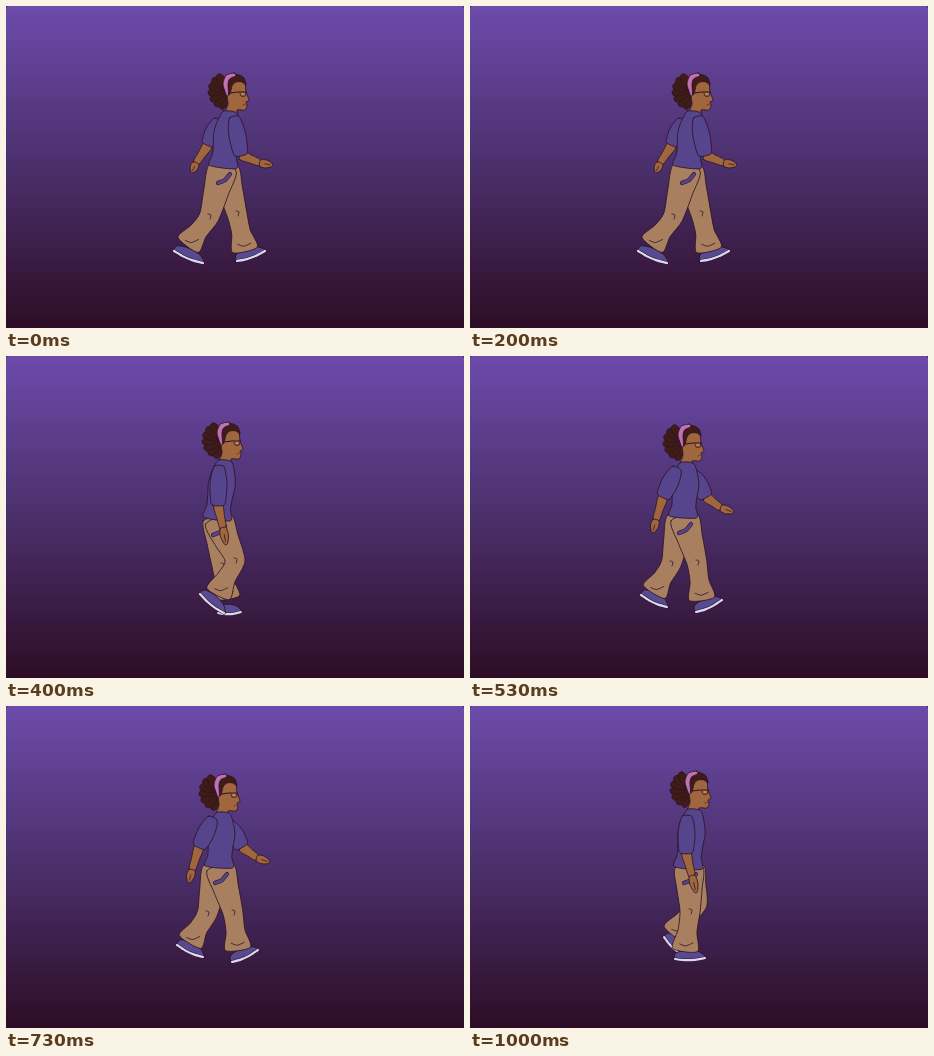
Write an HTML page that moves like this. It is 458 px wide and 322 px high and loops after 1070 ms.

```html
<!DOCTYPE html>
<html lang="en">
<head>
<meta charset="utf-8">
<title>Walk cycle</title>
<style>
html, body { margin: 0; width: 100%; height: 100%; overflow: hidden; background: #2d0d24; }
svg { display: block; width: 458px; height: 322px; }
path { stroke-linejoin: round; stroke-linecap: round; }
</style>
</head>
<body>
<svg id="stage" viewBox="0 0 458 322">
  <defs>
    <linearGradient id="dusk" x1="0" y1="0" x2="0" y2="1">
      <stop offset="0" stop-color="#6c4baa"/>
      <stop offset=".5" stop-color="#4b2f6b"/>
      <stop offset=".75" stop-color="#3c1e49"/>
      <stop offset="1" stop-color="#2d0d24"/>
    </linearGradient>
  </defs>
  <rect width="458" height="322" rx="2" fill="url(#dusk)"/>
</svg>
<script>
const NS = 'http://www.w3.org/2000/svg';
const stage = document.getElementById('stage');
const LOOP = 1070;
const INK = '#2e1424';
const COLORS = {
  skin: '#a0673f', hair: '#401c17', band: '#c072b6', shirt: '#56448c',
  pants: '#a88060', shoe: '#574a90', sole: '#dcd8f2'
};

// Widths along each body part, evenly spaced from its first joint to its last.
const WIDTHS = {
  torso: [13, 23, 27, 25, 24, 27],
  leg: [27, 25, 20, 19, 25],
  sleeve: [9, 15, 17, 16, 12],
  forearm: [9, 8, 6],
  hand: [6, 8, 3],
  lock: [5, 9, 5],
  band: [3, 5, 5, 2]
};

// Joints: leg = hip, knee, cuff; arm = shoulder, elbow, wrist, fingertip; foot = heel, toe.
const POSES = [
  {
    start: 0, head: [0, 0], torso: [[224, 106], [217, 161]],
    near: { leg: [[217, 161], [203, 211], [182, 239]], foot: [[168, 245], [197, 257]],
      arm: [[228, 111], [235, 149], [254, 157], [266, 159]] },
    far: { leg: [[218, 162], [231, 208], [239, 244]], foot: [[231, 255], [259, 245]],
      arm: [[213, 114], [202, 139], [190, 157], [186, 166]] }
  },
  {
    start: 270, head: [-6, -1], torso: [[219, 105], [211, 163]],
    near: { leg: [[212, 163], [229, 205], [212, 238]], foot: [[194, 238], [218, 257]],
      arm: [[213, 110], [212, 149], [217, 172], [220, 188]] },
    far: { leg: [[211, 163], [216, 210], [221, 242]], foot: [[212, 257], [235, 256]] }
  },
  {
    start: 530, head: [-9, 1], torso: [[217, 107], [213, 161]],
    near: { leg: [[214, 161], [227, 207], [232, 243]], foot: [[226, 256], [252, 244]],
      arm: [[207, 112], [193, 141], [186, 164], [183, 176]] },
    far: { leg: [[211, 162], [201, 208], [184, 236]], foot: [[171, 239], [197, 251]],
      arm: [[223, 117], [236, 141], [251, 152], [263, 156]] }
  },
  {
    start: 800, head: [-2, -2], torso: [[224, 104], [218, 162]],
    near: { leg: [[219, 161], [220, 206], [215, 244]], foot: [[205, 253], [235, 252]],
      arm: [[217, 110], [216, 147], [222, 170], [226, 186]] },
    far: { leg: [[220, 162], [227, 198], [204, 228]], foot: [[194, 231], [212, 248]] }
  }
];

function add(parent, tag, attrs = {}) {
  const el = document.createElementNS(NS, tag);
  for (const key in attrs) el.setAttribute(key, attrs[key]);
  return parent.appendChild(el);
}

const mix = (a, b, k) => a.map((v, i) => v + (b[i] - v) * k);
const points = text => text.split(' ').map(p => p.split(',').map(Number));

function curve(pts, closed) {
  const n = pts.length;
  const at = i => closed ? pts[(i + n) % n] : pts[Math.max(0, Math.min(n - 1, i))];
  const pull = (p, a, b, k) => p.map((v, j) => v + (b[j] - a[j]) * k);
  let d = 'M' + pts[0];
  for (let i = 0; i < (closed ? n : n - 1); i++) {
    const p = at(i), q = at(i + 1);
    d += 'C' + pull(p, at(i - 1), q, .13) + ' ' + pull(q, p, at(i + 2), -.13) + ' ' + q;
  }
  return closed ? d + 'Z' : d;
}

const shape = (g, color, pts) => add(g, 'path', {
  d: curve(pts, true), fill: COLORS[color], stroke: INK, 'stroke-width': .85
});
const line = (g, pts, color = INK, width = .8) => add(g, 'path', {
  d: curve(pts), fill: 'none', stroke: color, 'stroke-width': width
});

// Outline of a bent tube around a chain of joints.
function tube(g, color, joints, widths) {
  const last = joints.length - 1;
  const spine = widths.map((w, i) => {
    const u = i / (widths.length - 1) * last;
    const k = Math.min(Math.floor(u), last - 1);
    return mix(joints[k], joints[k + 1], u - k);
  });
  const side = sign => spine.map(([x, y], i) => {
    const a = spine[Math.max(0, i - 1)], b = spine[Math.min(spine.length - 1, i + 1)];
    const dx = b[0] - a[0], dy = b[1] - a[1];
    const r = sign * widths[i] / 2 / Math.hypot(dx, dy);
    return [x - dy * r, y + dx * r];
  });
  shape(g, color, [...side(1), ...side(-1).reverse()]);
}

function shoe(g, [heel, toe]) {
  const dx = toe[0] - heel[0], dy = toe[1] - heel[1];
  const turn = Math.atan2(dy, dx) * 180 / Math.PI;
  const foot = add(g, 'g', {
    transform: `translate(${heel}) rotate(${turn}) scale(${Math.hypot(dx, dy) / 30} 1)`
  });
  shape(foot, 'shoe', points('0,0 1,-6 8,-8 17,-8 25,-6 30,-2 30,0 15,2'));
  const sole = points('0,0 10,1.5 20,1.5 30,0');
  line(foot, sole, INK, 3.2);
  line(foot, sole, COLORS.sole, 2.2);
}

function leg(g, { leg: [hip, knee, cuff], foot }) {
  shoe(g, foot);
  tube(g, 'pants', [hip, knee, cuff], WIDTHS.leg);
  const [x, y] = knee;
  line(g, [[x - 1, y - 3], [x + 2, y - 2], [x + 1, y + 2]]);
  const [cx, cy] = mix(knee, cuff, .84);
  line(g, [[cx - 6, cy], [cx, cy + 2], [cx + 7, cy - 1]]);
}

function arm(g, [shoulder, elbow, wrist, tip]) {
  tube(g, 'skin', [elbow, wrist], WIDTHS.forearm);
  tube(g, 'skin', [wrist, tip], WIDTHS.hand);
  line(g, [mix(wrist, tip, .4), mix(wrist, tip, .85)]);
  tube(g, 'shirt', [shoulder, elbow], WIDTHS.sleeve);
}

function pocket(g, [x, y]) {
  const seam = [[x - 5, y + 16], [x + 2, y + 13], [x + 7, y + 7]];
  line(g, seam, INK, 4.2);
  line(g, seam, COLORS.shirt, 3);
}

function head(parent, offset) {
  const g = add(parent, 'g', { transform: `translate(${offset})` });
  for (let deg = 100; deg <= 245; deg += 24) {
    const a = deg * Math.PI / 180;
    tube(g, 'hair', [[221, 82], [219 + 16 * Math.cos(a), 85 + 17.5 * Math.sin(a)]], WIDTHS.lock);
  }
  shape(g, 'skin', points('225,74 234,73 239,77 240,86 243,94 240,96 241,99 239,104 231,104 231,110 219,109 222,98 221,88'));
  shape(g, 'hair', points('219,74 226,68 233,69 238,72 240,79 236,76 230,76 226,80 224,88 221,88'));
  tube(g, 'band', points('229,68.5 222,71 219.5,78 221.5,89'), WIDTHS.band);
  line(g, points('225,87 232,86 240,86'), INK, 1.1);
  line(g, points('234,87 235,90 239,90 240,86'));
  line(g, points('236,88 238,88'), '#d0a880', 1);
  line(g, points('237,99 240,98'), '#6b2f2b', .9);
}

function figure(pose) {
  const g = add(stage, 'g');
  const { near, far } = pose;
  if (far.arm) arm(g, far.arm);
  leg(g, far);
  leg(g, near);
  pocket(g, near.leg[0]);
  head(g, pose.head);
  tube(g, 'shirt', pose.torso, WIDTHS.torso);
  arm(g, near.arm);
  return { start: pose.start, g };
}

const figures = POSES.map(figure);

function render() {
  const t = performance.now() % LOOP;
  const current = figures.filter(f => f.start <= t).pop();
  for (const f of figures) f.g.style.display = f === current ? '' : 'none';
  requestAnimationFrame(render);
}
render();
</script>
</body>
</html>
```
